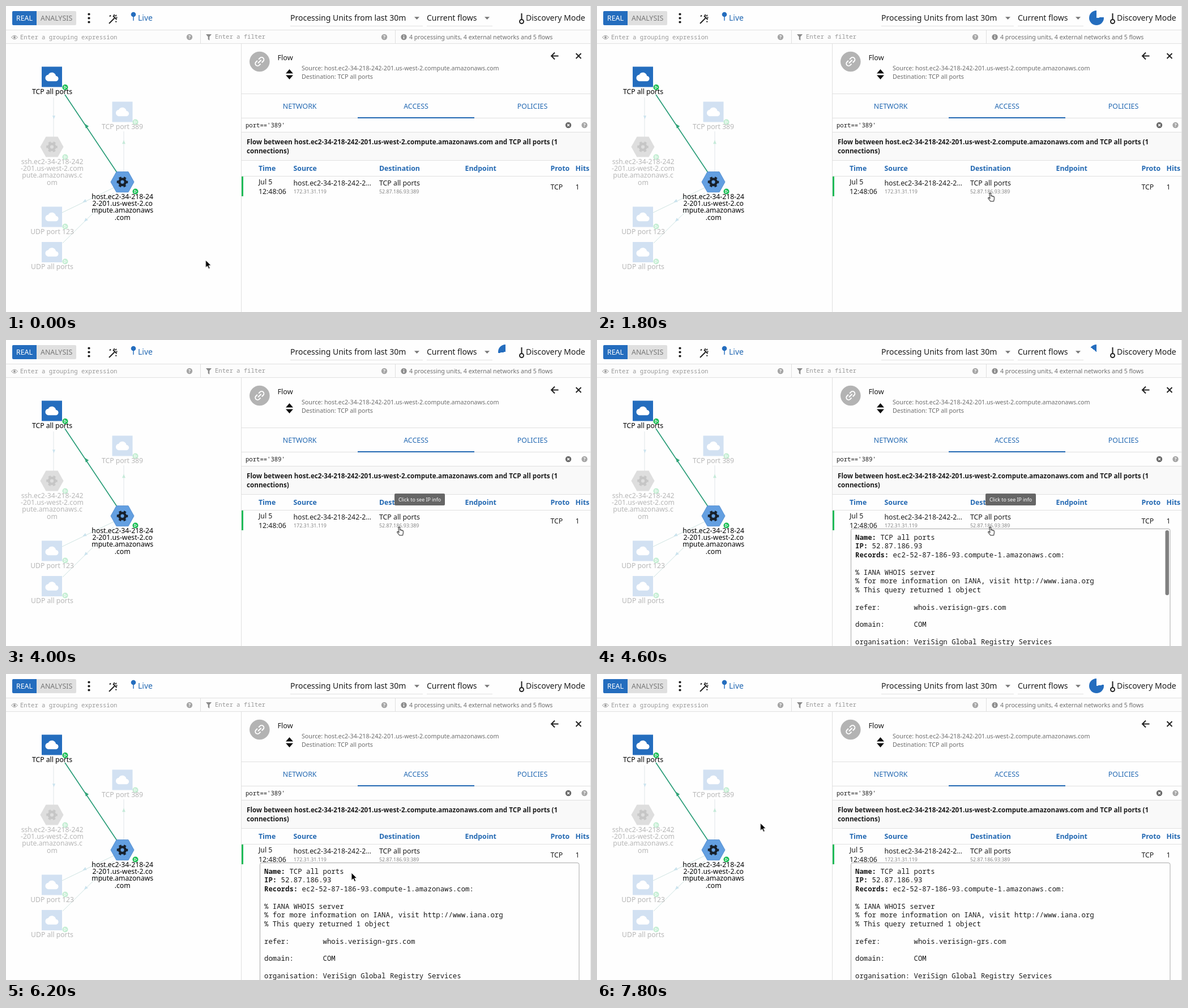
An HTML page for the animation above (8 s loop, 1033 by 542 pixels).

```html
<!DOCTYPE html>
<html lang="en">
<head>
<meta charset="utf-8">
<title>Flow access panel</title>
<style>
@property --cut { syntax: "<angle>"; inherits: false; initial-value: 360deg; }
html, body { margin: 0; width: 100%; height: 100%; overflow: hidden; background: #fefefe; }
svg { display: block; width: 1033px; height: 542px; font: 12.3px "Noto Sans", "Open Sans", sans-serif; fill: #1c1c1c; }
text, pre { white-space: pre; }
.big { font-size: 14px; }
.tab { font-size: 12.4px; fill: #2268b2; }
.head { font-weight: 700; fill: #2268b2; }
.info { font-size: 10.7px; fill: #6d6d6d; }
.tiny { font-size: 8.9px; fill: #858585; }
.mono { font-family: "Noto Sans Mono", "DejaVu Sans Mono", monospace; font-size: 10.58px; }
.hint { fill: #999; }
.mid { text-anchor: middle; }
.label { text-anchor: middle; font-size: 12.2px; fill: #000; }
.dim { fill: #b7b7b7; }
.rule { stroke: #e0e0e0; fill: none; }
.line { fill: none; stroke: #222; stroke-width: 2; }
pre { margin: 0; font: 12.33px/15.43px "Noto Sans Mono", "DejaVu Sans Mono", monospace; color: #181818; }
.pie { width: 26px; height: 26px; border-radius: 50%; background: conic-gradient(transparent var(--cut), #246dbe 0); }

.pie, .ring, .arrow, .hand, .tip, .popup, .thumb { animation: 8s step-end infinite; }
.pie { animation-name: pie; }
.ring { animation-name: ring; }
.arrow { animation-name: arrow; }
.hand { animation-name: hand; }
.tip { animation-name: tip; }
.popup { animation-name: popup; }
.thumb { animation-name: thumb; }

@keyframes pie {
  0% { --cut: 360deg; }
  10% { --cut: 4deg; animation-timing-function: steps(23, end); }
  67.5% { --cut: 372deg; }
  87.5% { --cut: 16deg; animation-timing-function: steps(5, end); }
  100% { --cut: 96deg; }
}
@keyframes ring {
  0%, 10%, 87.5%, 100% { opacity: 0; }
  5%, 80% { opacity: 1; }
}
@keyframes arrow {
  0% { transform: translate(352.5px, 450px); opacity: 1; }
  10% { transform: translate(352.5px, 451px); }
  15% { transform: translate(420px, 428px); }
  17.5% { transform: translate(560px, 376px); }
  20% { transform: translate(664px, 346px); opacity: 1; }
  22.5% { transform: translate(691px, 332px); opacity: 0; }
  77.5% { transform: translate(610px, 352px); opacity: 1; }
  80% { transform: translate(420px, 370px); }
  82.5% { transform: translate(310px, 373px); }
  85% { transform: translate(289.5px, 372px); }
  90% { transform: translate(289px, 340px); }
  92.5% { transform: translate(289px, 300px); }
  95% { transform: translate(288.5px, 275px); }
  97.5%, 100% { transform: translate(288.5px, 264px); opacity: 1; }
}
@keyframes hand {
  0%, 77.5%, 100% { opacity: 0; }
  22.5% { opacity: 1; }
}
@keyframes tip {
  0%, 77.5%, 100% { opacity: 0; }
  27.5% { opacity: 1; }
}
@keyframes popup {
  0% { opacity: 0; }
  55%, 100% { opacity: 1; }
}
@keyframes thumb {
  0%, 67.5%, 95%, 100% { opacity: 0; }
  55%, 82.5% { opacity: 1; }
  65%, 92.5% { opacity: .5; }
}
</style>
</head>
<body>
<svg viewBox="0 0 1033 542">
<defs>
  <path id="cloud" fill="#fff" transform="translate(-11.5 -11.5) scale(.96)" d="M19.35 10.04C18.67 6.59 15.64 4 12 4 9.11 4 6.6 5.64 5.35 8.04 2.34 8.36 0 10.91 0 14c0 3.31 2.69 6 6 6h13c2.76 0 5-2.24 5-5 0-2.64-2.05-4.78-4.65-4.96z"/>
  <g id="box"><rect x="-18" y="-18" width="36" height="36"/><use href="#cloud"/></g>
  <path id="hex" d="M-20.5 0-10.5-18H10.5L20.5 0 10.5 18H-10.5z"/>
  <g id="gear" fill="none">
    <circle r="5.3" stroke-width="4.4"/>
    <circle r="8.2" stroke-width="3.2" stroke-dasharray="4.3 4.287" stroke-dashoffset="2.15"/>
  </g>
  <g id="badge"><circle r="5" fill="#17bd52"/><path d="M-1.6-2.5 2.6 0-1.6 2.5z" fill="#17bd52" stroke="#fff"/></g>
  <path id="dart" d="M0-4 3.2 3.5H-3.2z"/>
  <path id="drop" d="M-4.5-2.2h9L0 2.4z" fill="#777"/>
  <g id="help"><circle r="5.2"/><text class="mid" y="3.1" style="font-size:8.5px;font-weight:700;fill:#fff">?</text></g>
</defs>

<rect width="1033" height="542" fill="#fefefe"/>
<rect y="43" width="1033" height="24" fill="#fcfcfc"/>
<rect x="416" y="224" width="617" height="49" fill="#f9f9f9"/>
<path class="rule" d="M0 42.5H1033M0 66.5H1033M343.5 43V67M687.5 43V67M416 155.5H1033M416 198.5H1033M416 223.5H1033M416 273.5H1033M416 301.5H1033"/>
<path class="rule" d="M415.5 67V542M1032.5 0V542" stroke="#d2d2d2"/>

<!-- toolbar -->
<path d="M13 9H54V34H13a2 2 0 0 1-2-2V11a2 2 0 0 1 2-2z" fill="#246dbe"/>
<path d="M54 9H122a2 2 0 0 1 2 2V32a2 2 0 0 1-2 2H54z" fill="#e0e0e0"/>
<text class="tab" x="18" y="26" style="fill:#fff">REAL</text>
<text class="tab" x="61" y="26" style="fill:#777">ANALYSIS</text>
<circle cx="146.5" cy="14.5" r="2.1"/><circle cx="146.5" cy="21.5" r="2.1"/><circle cx="146.5" cy="28.5" r="2.1"/>
<path class="line" d="M182 31 191.5 21.5" stroke-width="3.4"/>
<path class="line" d="M189 17.5 195.5 24M185 16.5l-2 2M191 15v2.5M195 16l-2 2M196.5 20.5h-2M195 28.5l-1.5-1.5" stroke-width="1.3"/>
<circle cx="225" cy="15" r="4.3" fill="#246dbe"/><path d="M225 18v8" stroke="#246dbe" stroke-width="1.4"/>
<text class="big" x="233" y="26" style="fill:#2268b2">Live</text>
<text class="big" x="502" y="26">Processing Units from last 30m</text>
<text class="big" x="743" y="26">Current flows</text>
<path class="rule" d="M502 35.5H736M743 35.5H859" stroke="#d5d5d5"/>
<use href="#drop" x="725.5" y="21.5"/><use href="#drop" x="849.5" y="21.5"/>
<path class="line" d="M910.5 13V24" stroke-width="1.2"/>
<circle class="line" cx="910.5" cy="27.5" r="3.5" stroke-width="1.2"/>
<text class="big" x="918" y="26">Discovery Mode</text>
<circle class="ring" cx="882" cy="21.5" r="9" fill="none" stroke="#b5b5b5" stroke-width="1.2"/>
<foreignObject x="869" y="8" width="26" height="26"><div class="pie"></div></foreignObject>

<!-- filters -->
<path d="M9.5 55.5Q15 49 20.500 55.5 15 62 9.500 55.5z" fill="none" stroke="#999"/><circle cx="15" cy="55.5" r="2" fill="#999"/>
<text class="mono hint" x="25" y="59">Enter a grouping expression</text>
<path d="M353 50h10l-3.700 4.500V61l-2.600-2V54.500z" fill="#8a8a8a"/>
<text class="mono hint" x="369" y="58">Enter a filter</text>
<g fill="#a5a5a5"><use href="#help" x="324" y="55"/><use href="#help" x="668" y="55"/><use href="#help" x="1021.500" y="211"/></g>
<circle cx="702.5" cy="55" r="5.2" fill="#8d8d8d"/><path d="M702.5 54v4M702.5 51.500v1.500" stroke="#fff" stroke-width="1.4"/>
<text class="info" x="712" y="59" style="font-size:10.58px">4 processing units, 4 external networks and 5 flows</text>

<!-- graph -->
<g fill="none">
  <path d="M84 162V232M208 222V294" stroke="#dfe5e8"/>
  <path d="M192 321 99 366M190 331 100 420" stroke="#cfe4e2"/>
  <path d="M196 295 104 157" stroke="#2a9d78" stroke-width="1.7"/>
</g>
<use href="#dart" transform="translate(141.500 212) rotate(-34)" fill="#2fa477"/>
<g fill="#cbe3ee">
  <use href="#dart" transform="translate(84.500 197) rotate(180) scale(.8)"/>
  <use href="#dart" transform="translate(138.500 346) rotate(-116) scale(.9)"/>
  <use href="#dart" transform="translate(140.500 379.500) rotate(-135) scale(.9)"/>
  <use href="#dart" transform="translate(208 241) scale(.9)" fill="#c6ead9"/>
</g>
<use href="#box" x="81" y="125.500" fill="#246dbe"/>
<g fill="#d2e1f2"><use href="#box" x="205.500" y="187.500"/><use href="#box" x="81" y="373.500"/><use href="#box" x="81" y="436"/></g>
<use href="#hex" x="81" y="249.500" fill="#dedede"/>
<use href="#gear" x="81" y="249.500" stroke="#c6c6c6"/>
<use href="#hex" x="205.500" y="311.700" fill="#639fe1" stroke="#5690d2"/>
<use href="#gear" x="205.500" y="311.700" stroke="#17202b"/>
<use href="#badge" x="104.500" y="144"/><use href="#badge" x="228.500" y="328.500"/>
<g opacity=".25"><use href="#badge" x="228.500" y="205.500"/><use href="#badge" x="104.500" y="267.500"/><use href="#badge" x="104.500" y="390.500"/><use href="#badge" x="104.500" y="452.500"/></g>
<text class="label" x="81.500" y="155.500">TCP all ports</text>
<text class="label dim" x="205.500" y="217.500">TCP port 389</text>
<text class="label dim" y="279.500"><tspan x="81.500">ssh.ec2-34-218-242</tspan><tspan x="81.500" dy="12.400">-201.us-west-2.com</tspan><tspan x="81.500" dy="12.400">pute.amazonaws.c</tspan><tspan x="81.500" dy="12.400">om</tspan></text>
<text class="label" y="341.500"><tspan x="205.700">host.ec2-34-218-24</tspan><tspan x="205.700" dy="12.400">2-201.us-west-2.co</tspan><tspan x="205.700" dy="12.400">mpute.amazonaws</tspan><tspan x="205.700" dy="12.400">.com</tspan></text>
<text class="label dim" x="81.500" y="403.500">UDP port 123</text>
<text class="label dim" x="81.500" y="465.500">UDP all ports</text>

<!-- flow panel -->
<circle cx="447.800" cy="98.500" r="17.800" fill="#b3b3b3"/>
<path transform="translate(447.800 98.500) rotate(-45)" d="M-1.500-4H-5a4 4 0 0 0 0 8H-1.500M1.500-4H5a4 4 0 0 1 0 8H1.500M-4 0H4" fill="none" stroke="#fff" stroke-width="2"/>
<text x="479.500" y="95.500" style="font-size:12.7px">Flow</text>
<path d="M494 119.500 500.500 112 507 119.500zM494 122.500h13L500.500 130z" fill="#111"/>
<text class="info" x="522" y="114">Source: host.ec2-34-218-242-201.us-west-2.compute.amazonaws.com</text>
<text class="info" x="522" y="129">Destination: TCP all ports</text>
<path class="line" d="M975.500 88.500H963M969 82.500l-6 6 6 6" stroke-width="1.700"/>
<path class="line" d="M1006.500 84l9 9M1015.500 84l-9 9" stroke-width="2.100"/>
<text class="tab mid" x="518.700" y="182">NETWORK</text>
<text class="tab mid" x="724" y="182">ACCESS</text>
<text class="tab mid" x="929.500" y="182">POLICIES</text>
<rect x="621" y="197" width="206" height="2" fill="#2268b2"/>
<text class="mono" x="423" y="214.500">port=='389'</text>
<circle cx="993" cy="211" r="5.200" fill="#666"/><path d="M991 209l4 4M995 209l-4 4" stroke="#fff" stroke-width="1.300"/>
<g style="font-size:11.68px;font-weight:700">
  <text x="425" y="245">Flow between host.ec2-34-218-242-201.us-west-2.compute.amazonaws.com and TCP all ports (1</text>
  <text x="425" y="261">connections)</text>
</g>
<g class="head">
  <text x="446" y="291.500">Time</text><text x="507.500" y="291.500">Source</text><text x="659" y="291.500">Destination</text>
  <text x="810.500" y="291.500">Endpoint</text><text x="961.500" y="291.500">Proto</text><text x="1005.500" y="291.500">Hits</text>
</g>
<rect x="416" y="302" width="3" height="35" fill="#1dbb58"/>
<text x="446" y="315.700">Jul 5</text><text x="446" y="332.500">12:48:06</text>
<text x="507.500" y="318">host.ec2-34-218-242-2...</text><text class="tiny" x="508" y="332">172.31.31.119</text>
<text x="659" y="318">TCP all ports</text><text class="tiny" x="659" y="332">52.87.186.93:389</text>
<text x="961.500" y="324.500">TCP</text><text x="1005.500" y="324.500">1</text>

<!-- overlays -->
<g class="popup">
  <rect x="448.500" y="334.500" width="563.500" height="230" rx="3" fill="#fefefe" stroke="#a9a9a9"/>
  <foreignObject x="456" y="342" width="540" height="200"><pre><b>Name:</b> TCP all ports
<b>IP:</b> 52.87.186.93
<b>Records:</b> ec2-52-87-186-93.compute-1.amazonaws.com:

% IANA WHOIS server
% for more information on IANA, visit http://www.iana.org
% This query returned 1 object

refer:        whois.verisign-grs.com

domain:       COM

organisation: VeriSign Global Registry Services</pre></foreignObject>
</g>
<rect class="thumb" x="1003.500" y="337" width="6.500" height="115" rx="3.200" fill="#808080"/>
<g class="tip">
  <rect x="686" y="272" width="89" height="21" rx="2" fill="#666"/>
  <text class="mid" x="730.500" y="286" style="font-size:8.8px;fill:#fff">Click to see IP info</text>
</g>
<path class="arrow" d="M0 0V13.500L3.200 10.600 5.400 15.500 7.700 14.500 5.600 9.700H9.700z" fill="#000" stroke="#fff" stroke-width=".9"/>
<path class="hand" transform="translate(690.500 331)" d="M2.500 1.500C2.500 0 4.700 0 5 1.500L5.500 5.500Q7 4.700 7.500 6 9 5.400 9.400 6.700 11 6.400 11 8V11L9.800 15H4.500L.8 10.500C-.5 8.500 1.200 7.700 2.200 8.800L3.300 9.800z" fill="#fff" stroke="#222" stroke-width="1.100"/>
</svg>
</body>
</html>
```
